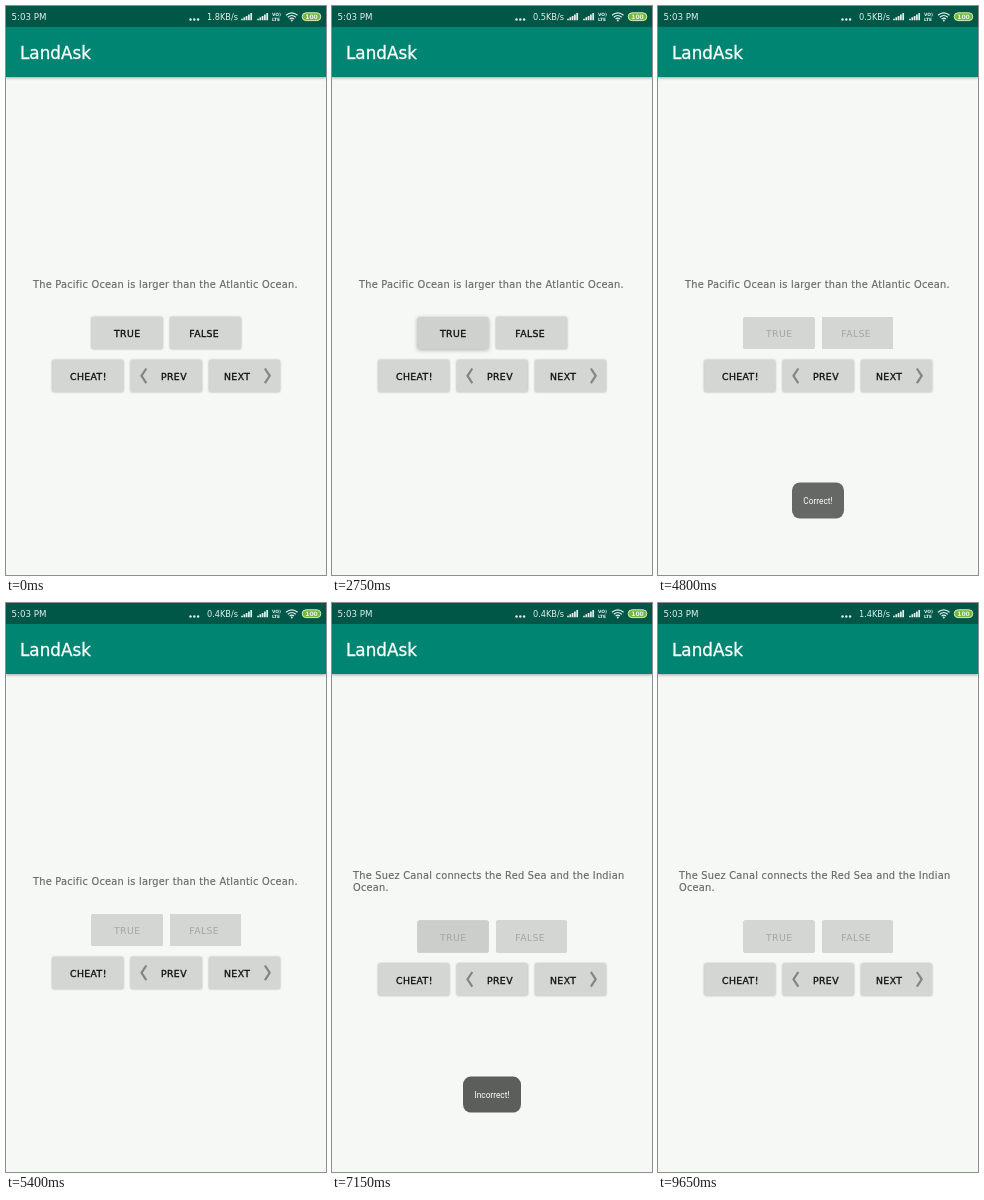
These frames come from a looping animation (320x569 px, 9700 ms). An HTML page:

```html
<!DOCTYPE html>
<html lang="en">
<head>
<meta charset="utf-8">
<style>
  html, body { margin: 0; width: 100%; height: 100%; overflow: hidden; background: #f6f8f5; }
  svg { display: block; width: 100vw; height: 100vh; }
  text { font-family: "DejaVu Sans", sans-serif; white-space: pre; stroke-linejoin: round; }
  .status text { fill: #e4f1ec; }
  .question { font-size: 9.8px; letter-spacing: .24px; fill: #666865; stroke: #666865; stroke-width: .15px; }
  .button text { font-size: 9.3px; letter-spacing: .4px; fill: #111; stroke: #111; stroke-width: .35px; }
  .button.off text { fill: #a4a6a3; stroke: none; }
  .chevron { fill: none; stroke: #838582; stroke-width: 2.2; }
  #toast text { font: 8.3px Roboto, sans-serif; fill: #fff; }
</style>
</head>
<body>
<svg viewBox="0 0 320 569" preserveAspectRatio="none">
  <rect width="320" height="569" fill="#f6f8f5"/>
  <rect y="21" width="320" height="50" fill="#008573" style="filter:drop-shadow(0 1px 1.5px #0005)"/>
  <rect width="320" height="21" fill="#005647"/>
  <text x="14" y="53" font-size="16.8" fill="#fff" stroke="#fff" stroke-width=".3">LandAsk</text>

  <g class="status">
    <text x="5.5" y="14" font-size="8.7">5:03 PM</text>
    <g fill="#e4f1ec"><circle cx="184.5" cy="13.5" r="1.2"/><circle cx="188.3" cy="13.5" r="1.2"/><circle cx="192.1" cy="13.5" r="1.2"/></g>
    <text id="speed" x="232" y="14" font-size="8.2" text-anchor="end"></text>
    <path id="bars" stroke="#e4f1ec" stroke-width="1.7"/>
    <text x="266" y="10.3" font-size="4.4" font-weight="bold">VO)</text>
    <text x="266" y="15.3" font-size="4.4" font-weight="bold">LTE</text>
    <g fill="none" stroke="#e4f1ec" stroke-width="1.2">
      <path d="M280 9.3q5.8 -5 11.6 0M281.8 11.2q4 -3.4 8 0M283.6 13q2.2 -1.9 4.4 0"/>
      <circle cx="285.8" cy="14.5" r=".4"/>
    </g>
    <rect x="296.2" y="6.8" width="18.6" height="7.8" rx="3.9" fill="#78b53c" stroke="#d6efb4"/>
    <text x="305.5" y="13" font-size="6" font-weight="bold" text-anchor="middle">100</text>
  </g>

  <text class="question" id="line1"></text>
  <text class="question" id="line2" x="21" y="288"></text>
  <g id="buttons"></g>
  <g id="toast">
    <rect y="476.5" height="36" rx="8" fill="#5c5e5b"/>
    <text x="160" y="497.5" text-anchor="middle"></text>
  </g>
</svg>
<script>
const LOOP = 9700, NEXT_QUESTION = 5680;
const $ = id => document.getElementById(id);
const clamp = v => Math.max(0, Math.min(1, v));

const speeds = [[0, '1.8'], [1200, '0.5'], [5200, '0.4'], [9200, '1.4']];
const toasts = [
  { start: 2985, end: 4780, text: 'Correct!', width: 52 },
  { start: 7000, end: 8800, text: 'Incorrect!', width: 58 }
];
const buttons = [
  { label: 'TRUE', x: 85.5, y: 311, textX: 108, answer: true, presses: [[2670, 2960], [6700, 6980]] },
  { label: 'FALSE', x: 164, y: 311, textX: 183.3, answer: true, presses: [] },
  { label: 'CHEAT!', x: 46.3, y: 354, textX: 64, presses: [] },
  { label: 'PREV', x: 124.7, y: 354, textX: 155, chevron: 'M140.3 362.5l-4.8 7.3 4.8 7.3', presses: [] },
  { label: 'NEXT', x: 203, y: 354, textX: 218, chevron: 'M258.9 362.5l4.8 7.3 -4.8 7.3', presses: [[5500, 5660]] }
];

$('bars').setAttribute('d', [236, 252].map(x =>
  [0, 1, 2, 3, 4].map(i => `M${x + i * 2.3} 14.3v${-1.6 - i * 1.4}`).join('')).join(''));

$('buttons').innerHTML = buttons.map(b => `<g class="button">
  <rect x="${b.x}" y="${b.y}" width="71" height="32" rx="1.5" fill="#d4d6d3"/>
  <rect x="${b.x}" y="${b.y}" width="71" height="32" rx="1.5"/>
  <text x="${b.textX}" y="${b.y + 20.3}">${b.label}</text>
  ${b.chevron ? `<path class="chevron" d="${b.chevron}"/>` : ''}</g>`).join('');
buttons.forEach((b, i) => b.node = $('buttons').children[i]);

function drawButton(b, t, disabled) {
  let lift = 0, ripple = 0;
  for (const [down, up] of b.presses) {
    if (t < down) continue;
    lift += clamp((t - down) / 100) * clamp(1 - (t - up) / 100);
    ripple += .08 * clamp((t - down) / 300) * clamp(1 - (t - up) / 330);
  }
  const off = b.answer && disabled;
  const [face, overlay] = b.node.children;
  b.node.setAttribute('class', off ? 'button off' : 'button');
  face.style.filter = off ? 'drop-shadow(0 0 .4px #0004)'
    : `drop-shadow(0 ${.9 + 1.1 * lift}px ${1 + 1.2 * lift}px rgba(0,0,0,.3))`;
  overlay.setAttribute('opacity', ripple);
}

function drawToast(t) {
  const toast = toasts.find(o => t >= o.start && t < o.end + 300);
  $('toast').style.display = toast ? '' : 'none';
  if (!toast) return;
  const p = clamp((t - toast.start) / 280);
  const y = 12 * (1 - p) ** 1.8 * Math.cos(2 * Math.PI * p);
  const [box, label] = $('toast').children;
  box.setAttribute('x', 160 - toast.width / 2);
  box.setAttribute('width', toast.width);
  label.textContent = toast.text;
  $('toast').setAttribute('transform', `translate(0 ${y})`);
  $('toast').setAttribute('opacity', clamp((t - toast.start) / 120) * clamp(1 - (t - toast.end) / 300));
}

function draw(now) {
  const t = now % LOOP;
  const second = t >= NEXT_QUESTION;
  const disabled = t >= 6980 || (t >= 2960 && !second);
  $('speed').textContent = speeds.filter(s => t >= s[0]).pop()[1] + 'KB/s';
  $('line1').textContent = second ? 'The Suez Canal connects the Red Sea and the Indian'
    : 'The Pacific Ocean is larger than the Atlantic Ocean.';
  $('line1').setAttribute('x', second ? 21 : 27);
  $('line1').setAttribute('y', second ? 275.5 : 281.7);
  $('line2').textContent = second ? 'Ocean.' : '';
  $('buttons').setAttribute('transform', `translate(0 ${second ? 6.5 : 0})`);
  buttons.forEach(b => drawButton(b, t, disabled));
  drawToast(t);
}

const origin = performance.now();
function tick() {
  draw(performance.now() - origin);
  requestAnimationFrame(tick);
}
tick();
</script>
</body>
</html>
```
